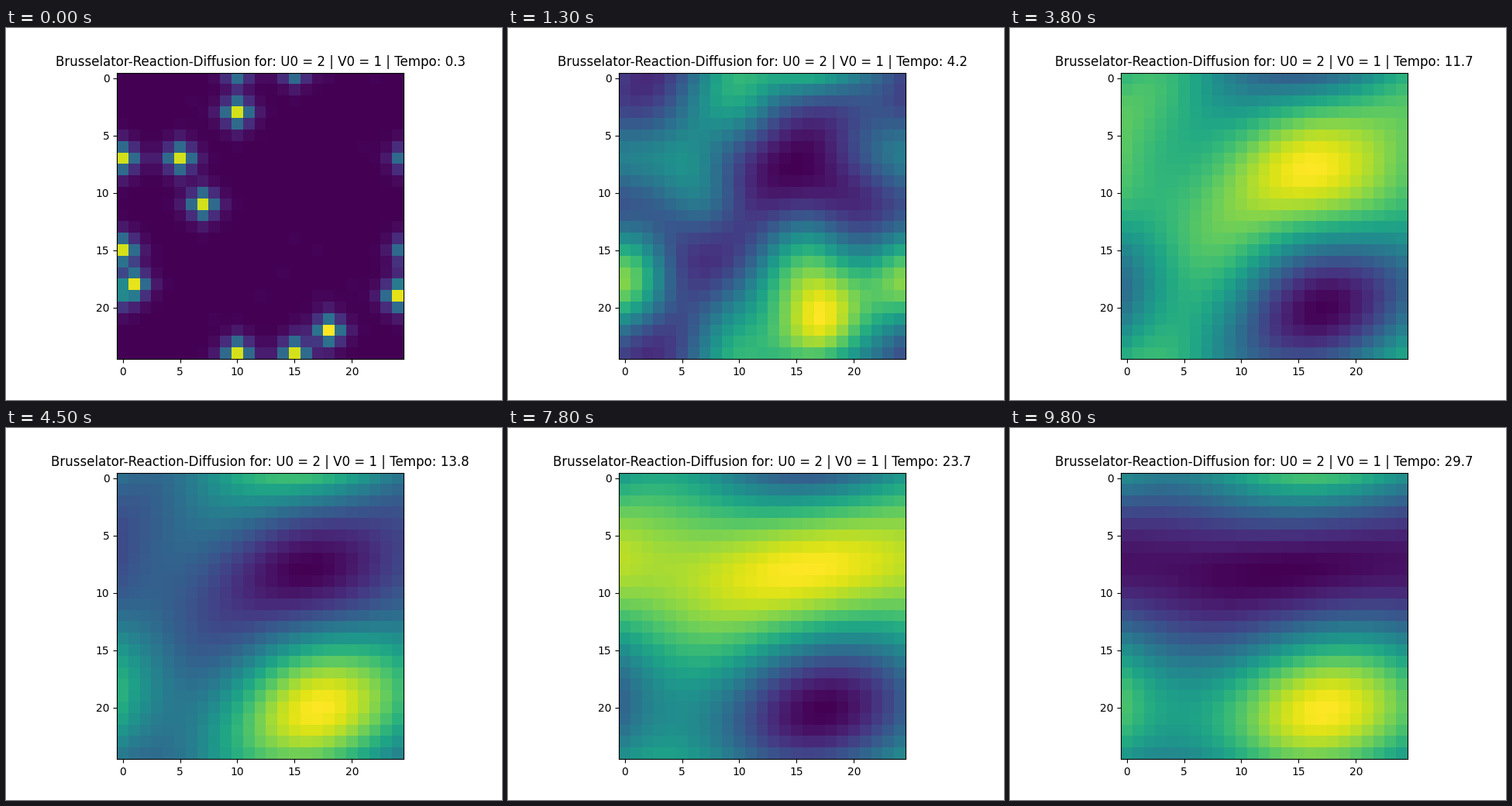
A matplotlib script that plays this animation: 640 px wide and 480 px high, repeating every 9.9 s.

```python
import numpy as np
import matplotlib.pyplot as plt
from matplotlib.animation import FuncAnimation

N = 25
FRAMES = 99
STEP = 0.3

# (row, col) of the seeds of both species
U_SEEDS = [(3, 10), (7, 0), (7, 5), (11, 7), (15, 0), (18, 1),
           (19, 24), (22, 18), (24, 10), (24, 15)]
V_SEEDS = [(0, 22), (2, 6), (6, 21), (14, 15), (15, 17), (17, 14),
           (18, 20), (19, 12), (19, 17), (21, 8), (21, 17)]

U_DECAY = 4.0       # fast loss of the U spikes
U_SPREAD = 1.33     # diffusion while the spikes last
SPREAD = 1.0        # diffusion of the lasting excess
U_SHARE = 1.6       # excess left by a U seed, relative to a V seed
PEAK, PERIOD, FALL = 5.4, 4.25, 2.05   # rhythm of the oscillation


def seeded(points):
    z = np.zeros((N, N))
    for p in points:
        z[p] = 1
    return z


U = seeded(U_SEEDS)
U[22, 18] = 1.07
EXCESS = U_SHARE * U + seeded(V_SEEDS)

WAVE = 2 - 2 * np.cos(2 * np.pi * np.fft.fftfreq(N))
LAPLACE = WAVE[:, None] + WAVE[None, :]


def diffuse(z, amount):
    """Heat flow on the periodic grid."""
    return np.fft.ifft2(np.fft.fft2(z) * np.exp(-amount * LAPLACE)).real


def field(t):
    """Decaying U spikes give way to the slowly spreading excess."""
    spikes = 2 * np.exp(-U_DECAY * t) * diffuse(U, U_SPREAD * t)
    gain = 0.04 * min(1, (t / 0.9) ** 2)
    z = spikes + gain * diffuse(EXCESS, SPREAD * t)
    z = (z - z.min()) / (z.max() - z.min())
    # the pattern is inverted while the oscillation falls
    falling = t > PEAK and (t - PEAK) % PERIOD < FALL
    return 1 - z if falling else z


def label(t):
    return ("Brusselator-Reaction-Diffusion for: "
            f"U0 = 2 | V0 = 1 | Tempo: {t:.1f}")


fig, ax = plt.subplots(figsize=(6.4, 4.8), dpi=100)
image = ax.imshow(field(STEP), cmap="viridis", vmin=0, vmax=1)
title = ax.set_title(label(STEP))


def draw(i):
    t = round(STEP * (i + 1), 1)
    image.set_data(field(t))
    title.set_text(label(t))
    return image, title


anim = FuncAnimation(fig, draw, frames=FRAMES, interval=100,
                     repeat=True, repeat_delay=0, blit=False)
plt.show()
```
